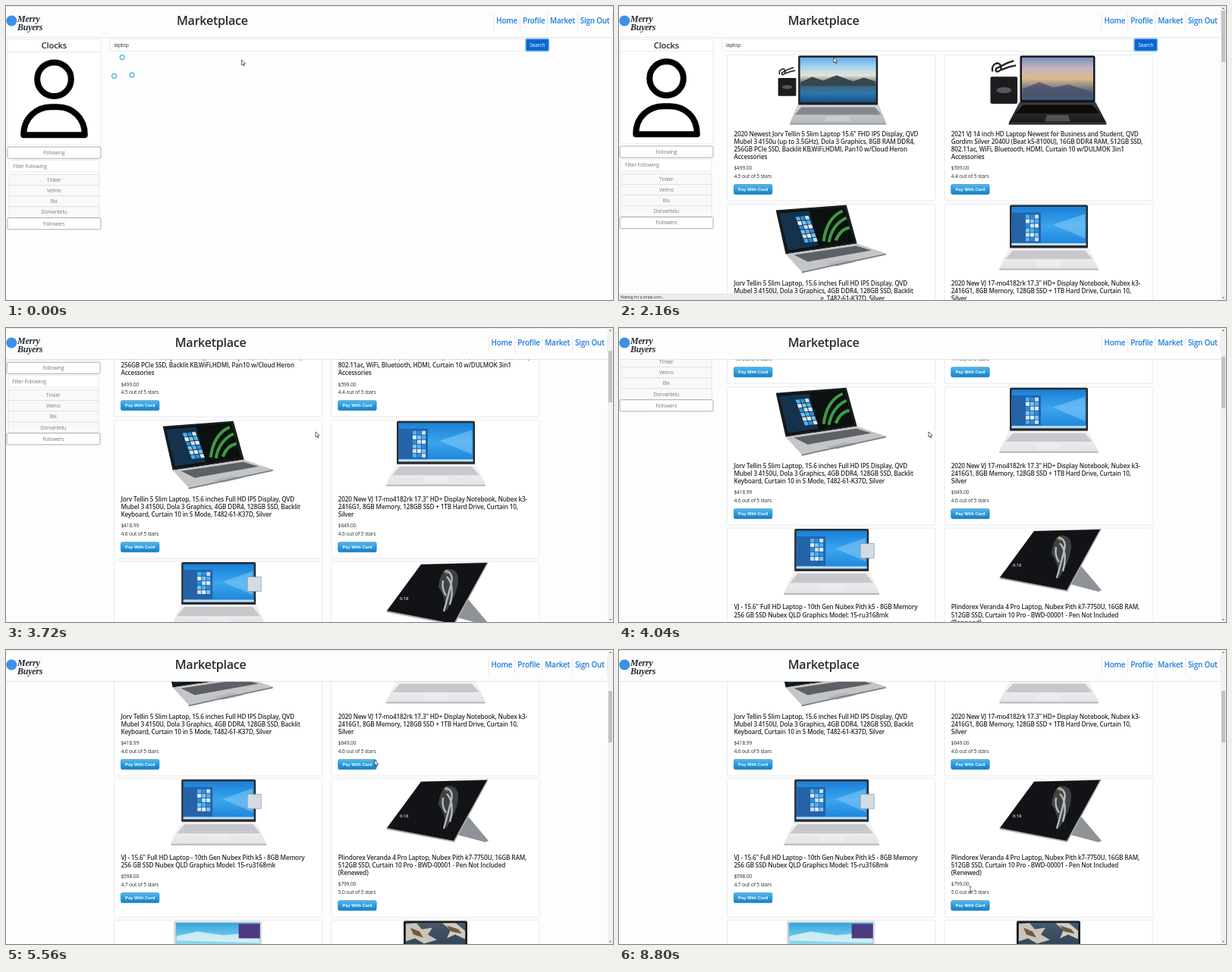
Animation of 800 by 388 pixels, one loop 8840 ms. Source, as an HTML page:

```html
<!DOCTYPE html>
<html lang="en">
<head>
<meta charset="utf-8">
<title>Marketplace</title>
<style>
  html, body { margin: 0; width: 100%; height: 100%; overflow: hidden; background: #fdfdfe; }
  svg { display: block; width: 800px; height: 388px; }
  text { font-family: "Open Sans", "Noto Sans", sans-serif; letter-spacing: -.02em; fill: #282c30; white-space: pre; }
  .b { font-weight: 600; }
  .mid { text-anchor: middle; }
  .soft { fill: #75797d; }
  .pale { fill: #fff; }
  .nav { fill: #1b7bd8; font-weight: 600; }
  .pay { font: bold 5.8px "Liberation Sans", Arial, sans-serif; fill: #fff; letter-spacing: 0; }
  .logo { font: italic bold 12px "Liberation Serif", "Noto Serif", serif; }
  .box { fill: #fff; stroke: #dfe1e4; stroke-width: .7; }
</style>
</head>
<body>
<svg id="stage" viewBox="0 0 800 388"></svg>
<script>
const LOOP = 8840, LOADED = 1400;

const text = (x, y, s, size, cls = '') =>
  `<text x="${x}" y="${y}" font-size="${size}" class="${cls}">${s}</text>`;
const rect = (x, y, w, h, fill, more = '') =>
  `<rect x="${x}" y="${y}" width="${w}" height="${h}" fill="${fill}" ${more}/>`;
const poly = (points, fill, more = '') => `<polygon points="${points}" fill="${fill}" ${more}/>`;
const box = (x, y, w, h, r = 1.5) =>
  `<rect x="${x}" y="${y}" width="${w}" height="${h}" rx="${r}" class="box"/>`;
const gradient = (id, ...colors) => `<linearGradient id="${id}" x2="0" y2="1">` +
  colors.map((c, i) => `<stop offset="${i / (colors.length - 1)}" stop-color="${c}"/>`).join('') +
  '</linearGradient>';

const defs = '<defs>' +
  gradient('pay', '#58b9ea', '#2a9ade', '#1580c6') +
  gradient('lake', '#64aee6', '#a5d2f0', '#e6e2d6', '#46606a', '#2a78b0', '#174f80') +
  gradient('coast', '#7590bd', '#c6b5bd', '#d9bb8c', '#6b7188', '#3d5680') +
  gradient('desk', '#1a80d8', '#3aa5ee', '#1c84da') +
  gradient('sea', '#35a6de', '#94dcf0', '#3fb0cc') +
  gradient('rocks', '#46586a', '#33465a', '#2c3b4c') +
  gradient('metal', '#d4d6d9', '#b4b7bb') +
  gradient('white', '#f4f4f5', '#e2e3e5') +
  gradient('black', '#3c3d40', '#18191b') +
  '</defs>';

// Pictures use coordinates relative to their card.
const keyTones = { black: '#0c0c0d', metal: '#85888d', white: '#c6c8cc' };
const edgeTones = { black: '#111', metal: '#8e9196', white: '#b3b5b9' };

function laptop(x, w, h, depth, spread, lid, wall, base) {
  const r = x + w, y = h + 3, end = y + depth;
  return rect(x, 1, w, h, lid, 'rx="2"') +
    rect(x + 2.5, 3.5, w - 5, h - 7, `url(#${wall})`) +
    poly(`${x - 1},${h} ${r + 1},${h} ${r + spread},${end - 3} ${x - spread},${end - 3}`, `url(#${base})`) +
    poly(`${x + 4},${y} ${r - 4},${y} ${r + spread * .4},${y + depth * .42} ${x - spread * .4},${y + depth * .42}`, keyTones[base]) +
    poly(`${x + w * .36},${y + depth * .5} ${r - w * .36},${y + depth * .5} ${r - w * .33},${end - 5} ${x + w * .33},${end - 5}`, '#fff', 'opacity=".22"') +
    rect(x - spread, end - 3, w + 2 * spread, 2, edgeTones[base], 'rx="1"');
}

function tiles(x, y, cols, rows, size) {
  const tones = ['#4fb2f2', '#e4f1fa', '#2f8ddc', '#7cc4f0', '#c9e3f5'];
  let out = '';
  for (let i = 0; i < cols * rows; i++)
    out += rect(x + i % cols * (size + 1), y + (i / cols | 0) * (size + 1), size, size, tones[i * 7 % 5]);
  return out;
}
// Desktop with an open menu, a light beam and a pale task bar.
const desktop = (x, w, h) => rect(x + 3, 11, 38, h - 18, '#2463a8') +
  tiles(x + 21, 14, 3, Math.floor((h - 22) / 6), 5) +
  poly(`${x + w * .55},27 ${x + w - 4},13 ${x + w - 4},${h - 13}`, '#8bd0fa', 'opacity=".5"') +
  rect(x + 2.5, h - 6.5, w - 5, 3, '#c5dced');

const extras = (x, y, s) => `<g transform="translate(${x} ${y}) scale(${s})">` +
  rect(0, 22, 36, 36, '#1c1c1e', 'rx="2"') + '<ellipse cx="18" cy="40" rx="10" ry="4" fill="#57585b"/>' +
  '<path d="M3 15C0 5 12 0 14 8S4 18 8 11L22 4L31 1M14 13L25 9L34 7" fill="none" stroke="#222" stroke-width="2.4"/></g>';

const pictures = [
  extras(67, 16, .66) + laptop(93.5, 105, 66, 24, 11, '#202225', 'lake', 'metal') +
    poly('97,36 112,29 126,34 144,27 166,35 180,30 195,35 195,41 97,41', '#35474c'),
  extras(60.5, 7, .99) + laptop(99.5, 99, 63, 27, 15, '#17181a', 'coast', 'black') +
    poly('103,45 125,36 144,43 163,39 195,49 195,56 103,56', '#474e67', 'opacity=".75"'),
  poly('64,8 157,1 171,52 77,66', '#1b1c1e') + poly('67,10 154,4 167,50 79,63', '#0b110f') +
    poly('68,12 108,9 120,55 80,61', '#14324c') +
    `<g transform="translate(90 17) rotate(-6) skewX(14)">${tiles(0, 0, 3, 6, 5)}</g>` +
    '<path d="M127 49Q131 18 152 9M134 50Q138 27 157 18M143 48Q149 33 161 31" fill="none" stroke="#3f9a44" stroke-width="4"/>' +
    poly('77,66 171,52 209,65 98,89', '#c3c5c9') + poly('88,67 170,55 190,61 106,76', '#5d6065') +
    poly('130,79 155,73 170,76 144,82', '#b2b5b9') + poly('98,89 209,65 209,67 98,91', '#7d8085'),
  laptop(86, 103, 58, 27, 14, '#2a2c2f', 'desk', 'white') + desktop(86, 103, 58),
  laptop(88.5, 98, 57, 29, 14, '#2a2c2f', 'desk', 'white') + desktop(88.5, 98, 57) +
    rect(175.5, 20.5, 18, 19, '#d5dbe3', 'stroke="#8798ad" stroke-width=".7"'),
  poly('180,50 207,82 203,84 158,72', '#8f9397') +
    poly('118,4 207,1 162,84 72,67', '#a9acb0') + poly('118,4 205,2 161,82 73,65', '#111316') +
    '<path d="M151 10Q167 8 167 24T151 66Q150 46 141 34Q142 18 151 10" fill="#3e4246"/>' +
    '<path d="M150 12Q161 15 158 28T148 66M152 20Q163 32 156 57M147 25Q145 37 151 45" fill="none" stroke="#b8babb" stroke-width="2.4"/>' +
    '<path d="M148 13L153 16" stroke="#c47b36" stroke-width="1.6"/>' +
    text(90, 51, '6:18', 6, 'pale'),
  laptop(78.5, 116, 66, 24, 10, '#d9dbdd', 'sea', 'white') +
    poly('82,21 110,15 144,20 165,18 191,24 191,30 82,27', '#e5f5f7', 'opacity=".8"') +
    rect(164, 5, 28, 19, '#4d397f'),
  laptop(95, 84, 62, 26, 12, '#1a1c1e', 'rocks', 'black') +
    poly('98,5 112,4 119,12 133,10 127,19 139,26 122,31 110,24 98,28', '#cbc5b8') +
    poly('146,4 164,4 176,14 176,25 163,19 152,24 157,13', '#d2ccc0') +
    poly('104,10 116,15 121,23 108,19', '#6d5a45') + poly('152,7 167,12 172,18 158,15', '#6d5a45')
];

const products = [
  ['2020 Newest Jorv Tellin 5 Slim Laptop 15.6" FHD IPS Display, QVD|Mubel 3 4150u (up to 3.5GHz), Dola 3 Graphics, 8GB RAM DDR4,|256GB PCIe SSD, Backlit KB,WiFi,HDMI, Pan10 w/Cloud Heron|Accessories', '499.00', '4.5'],
  ['2021 VJ 14 inch HD Laptop Newest for Business and Student, QVD|Gordim Silver 2040U (Beat k5-8100U), 16GB DDR4 RAM, 512GB SSD,|802.11ac, WiFi, Bluetooth, HDMI, Curtain 10 w/DULMOK 3in1|Accessories', '599.00', '4.4'],
  ['Jorv Tellin 5 Slim Laptop, 15.6 inches Full HD IPS Display, QVD|Mubel 3 4150U, Dola 3 Graphics, 4GB DDR4, 128GB SSD, Backlit|Keyboard, Curtain 10 in S Mode, T482-61-K37D, Silver', '418.99', '4.6'],
  ['2020 New VJ 17-mo4182rk 17.3" HD+ Display Notebook, Nubex k3-|2416G1, 8GB Memory, 128GB SSD + 1TB Hard Drive, Curtain 10,|Silver', '649.00', '4.6'],
  ['VJ - 15.6" Full HD Laptop - 10th Gen Nubex Pith k5 - 8GB Memory|256 GB SSD Nubex QLD Graphics Model: 15-ru3168mk', '598.00', '4.7'],
  ['Plindorex Veranda 4 Pro Laptop, Nubex Pith k7-7750U, 16GB RAM,|512GB SSD, Curtain 10 Pro - BWD-00001 - Pen Not Included|(Renewed)', '799.00', '5.0'],
  ['', '', ''], ['', '', '']
];
const rowTop = [64.5, 261.5, 447.8, 634.5], rowHeight = [192.5, 182.5, 183, 183];

function card([title, price, stars], i) {
  const row = i >> 1, lines = title.split('|'), y = 107 + 10.1 * lines.length;
  let out = box(0, 0, 274, rowHeight[row]) + pictures[i];
  if (title) out += lines.map((s, n) => text(8.7, 107.4 + 10.1 * n, s, 8.2, 'b')).join('') +
    text(8.7, y + 4.4, '$' + price, 6.7) + text(8.7, y + 14.8, stars + ' out of 5 stars', 6.7) +
    rect(8.7, y + 23.6, 50.5, 13, 'url(#pay)', 'rx="2" stroke="#1878b4" stroke-width=".6"') +
    text(34, y + 32.3, 'Pay With Card', 5.8, 'pay mid');
  return `<g transform="translate(${i % 2 ? 429 : 142.7} ${rowTop[row]})">${out}</g>`;
}

const search = (x, y, w) => box(x, y, w, 16) + text(x + 5, y + 10.3, 'laptop', 6.7) +
  rect(x + w + .5, y - .3, 30.5, 16.3, '#0b66d2', 'rx="1.8" stroke="#7db6f7" stroke-width="1.4"') +
  text(x + w + 15.8, y + 10.2, 'Search', 6.7, 'mid pale');

const outlineButton = (y, s) =>
  rect(2, y, 123, 15.2, '#fff', 'rx="1.8" stroke="#868d93" stroke-width=".7"') +
  text(63.3, y + 10, s, 6.7, 'mid soft');

const sidebar = box(2, 44, 123, 17, 0) + text(63.3, 55.5, 'Clocks', 11.3, 'b mid') +
  '<g id="panel">' + box(2, 61, 123, 122, 0) +
  '<g fill="none" stroke="#000" stroke-width="8" stroke-linejoin="round"><circle cx="63.5" cy="96.7" r="22.3"/>' +
  '<path d="M23.2 170.3C23 147 41 133.3 59 133.3H68C87 133.3 104 147 103.8 170.3Z"/></g>' +
  outlineButton(186, 'Following') + box(4, 203.3, 119, 15.5) + text(9, 213.6, 'Filter Following', 6.7, 'soft') +
  ['Tinker', 'Velmo', 'Bix', 'Dorvantelu'].map((s, i) =>
    rect(4, 222.3 + i * 14.2, 119, 14.2, '#f9f9fa', 'stroke="#dadcdf" stroke-width=".7"') +
    text(63.3, 231.8 + i * 14.2, s, 6.7, 'mid soft')).join('') +
  outlineButton(279.6, 'Followers') + '</g>';

const header = rect(0, 0, 800, 41.3, '#fdfdfe') + rect(0, 41, 800, .8, '#dedfe2') + rect(0, 0, 800, .6, '#d9dadd') +
  '<circle cx="7.3" cy="19.5" r="7" fill="#3d8fe8"/>' +
  text(15, 21, 'Merry', 12, 'logo') + text(15, 31.5, 'Buyers', 12, 'logo') +
  '<g id="heading">' + text(225, 25.3, 'Marketplace', 16.2, 'b') + '</g><g id="nav">' +
  [['Home', 646.3], ['Profile', 681], ['Market', 717], ['Sign Out', 756.7]].map(([s, x]) =>
    rect(x - 3.8, 9, .7, 23, '#dcdee0') + text(x, 23.2, s, 9.9, 'nav')).join('') +
  rect(799.2, 9, .7, 23, '#dcdee0') + '</g>';

const balls = '<circle r="2.9" fill="none" stroke="#35afd8" stroke-width="1.15"/>'.repeat(3);

document.getElementById('stage').innerHTML = defs +
  `<g id="content"><g id="side">${sidebar}</g>` +
  `<g id="wide">${search(137.5, 43.5, 547)}<g id="balls">${balls}</g></g>` +
  `<g id="narrow">${search(136, 43.4, 542.5)}${products.map(card).join('')}</g></g>` + header +
  '<g id="bar">' + rect(793, 0, 7, 388, '#f1f1f2') + rect(794, 0, 5, 68, '#c1c2c4', 'id="thumb"') +
  poly('794.8,4 796.5,2 798.2,4', '#777') + poly('794.8,384 796.5,386 798.2,384', '#777') + '</g>' +
  '<g id="status">' + rect(0, 380, 266, 8, '#eceded', 'stroke="#d2d3d5" stroke-width=".5"') +
  text(2, 386.2, 'Waiting for q.stripe.com...', 5) + '</g>' +
  '<path id="arrow" d="M0 0V7L1.6 5.6L2.7 8L3.9 7.5L2.8 5.1H5Z" fill="#fff" stroke="#222" stroke-width=".7"/>' +
  '<path id="beam" d="M-1.5 0H1.5M0 0V7.5M-1.5 7.5H1.5" fill="none" stroke="#333" stroke-width=".7"/>';

const $ = id => document.getElementById(id);
const show = (id, on) => $(id).style.display = on ? '' : 'none';
const move = (el, x, y) => el.setAttribute('transform', `translate(${x} ${y})`);

// Eased value between the keys [time, ...values] around t.
function track(t, keys) {
  const i = keys.findIndex(k => k[0] > t);
  if (i < 0) return keys[keys.length - 1].slice(1);
  if (i === 0) return keys[0].slice(1);
  const a = keys[i - 1], b = keys[i], p = (t - a[0]) / (b[0] - a[0]), e = p * p * (3 - 2 * p);
  return a.slice(1).map((v, n) => v + (b[n + 1] - v) * e);
}

const scrollKeys = [[2820, 0], [3120, 68.3], [3350, 69], [3660, 139.7], [3800, 139.7], [4440, 278]];
const cursorKeys = [[300, 310.5, 71], [1700, 283, 68], [2180, 283, 68], [2750, 408, 137],
  [4900, 408, 137], [6500, 618, 159.5], [7500, 618, 159.5], [8700, 463, 312.5]];
const corners = [[141, 92.5], [153.9, 66.2], [166.7, 92.5]];

function frame() {
  const t = performance.now() % LOOP, loaded = t >= LOADED;
  const [scroll] = track(t, scrollKeys), [x, y] = track(t, cursorKeys);
  show('wide', !loaded);
  show('narrow', loaded);
  show('bar', loaded);
  show('status', loaded && t < 2520);
  move($('content'), 0, -scroll);
  move($('side'), loaded ? -.9 : 0, 0);
  move($('panel'), 0, loaded ? -1.1 : 0);
  move($('heading'), loaded ? -2.3 : 0, 0);
  move($('nav'), loaded ? -6.8 : 0, 0);
  $('thumb').setAttribute('y', 6 + scroll * .173);

  // Three balls chase each other round a triangle.
  const leg = t / 733.3 + .94, p = leg % 1;
  [...$('balls').children].forEach((ball, i) => {
    const n = (i + Math.floor(leg)) % 3, a = corners[n], b = corners[(n + 1) % 3];
    move(ball, a[0] + (b[0] - a[0]) * p, a[1] + (b[1] - a[1]) * p);
  });

  const overText = t > 8480;
  show('arrow', !overText);
  show('beam', overText);
  move($('arrow'), x, y);
  move($('beam'), x, y);
  requestAnimationFrame(frame);
}
frame();
</script>
</body>
</html>
```
